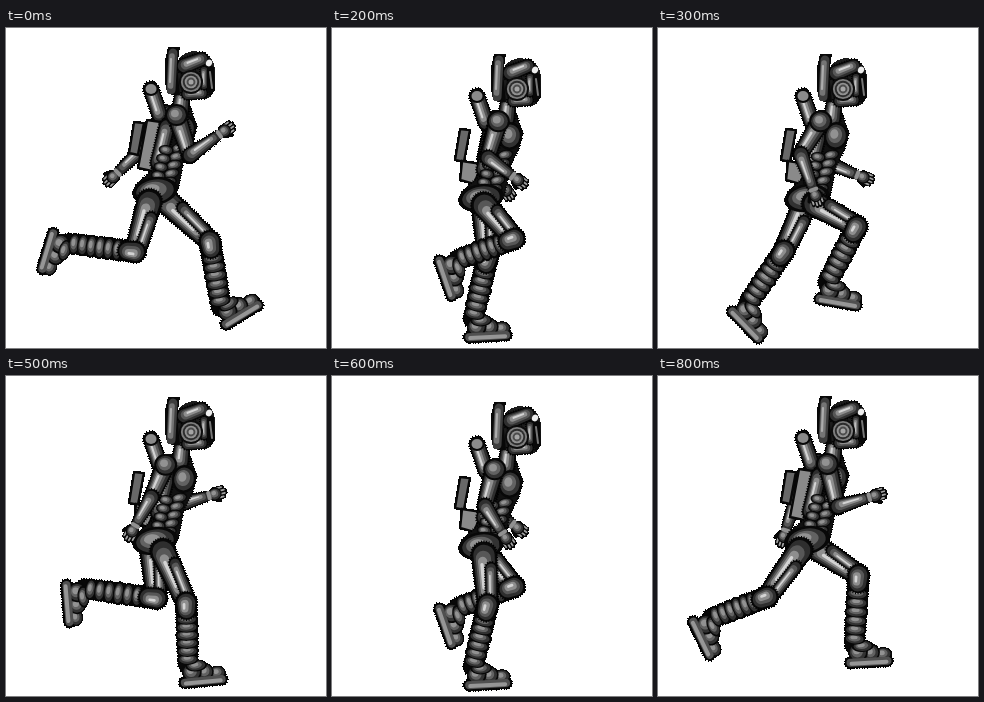
An HTML page with a canvas that plays this animation: 320x320 px, repeating every 900 ms.

```html
<!DOCTYPE html>
<html lang="en">
<head>
<meta charset="utf-8">
<title>Running robot</title>
<style>
  html, body { margin: 0; width: 100%; height: 100%; overflow: hidden; background: #fff; }
  canvas { display: block; width: 100vw; height: 100vh; object-fit: contain; image-rendering: pixelated; }
</style>
</head>
<body>
<canvas id="stage" width="320" height="320"></canvas>
<script>
const ctx = document.getElementById('stage').getContext('2d', { willReadFrequently: true });
const STEP = 100, STEPS = 9, PHASES = 10;
const INK = '#080808';

// ---- geometry ----

const turnOf = p => p / PHASES * 2 * Math.PI;
const mix = (a, b, t) => [a[0] + (b[0] - a[0]) * t, a[1] + (b[1] - a[1]) * t];
const angleOf = (a, b) => Math.atan2(b[1] - a[1], b[0] - a[0]);

// Point measured along and across a direction.
const offset = (p, angle, along, across) => [
  p[0] + Math.cos(angle) * along - Math.sin(angle) * across,
  p[1] + Math.sin(angle) * along + Math.cos(angle) * across
];

// Periodic curve; every term is [harmonic, cosine part, sine part].
function wave(p, mean, ...terms) {
  const a = turnOf(p);
  return terms.reduce((sum, [n, c, s = 0]) =>
    sum + c * Math.cos(n * a) + s * Math.sin(n * a), mean);
}

// ---- gait ----

const bobAt = p => Math.max(0, Math.round(3 + 5 * Math.cos((p - 2.4) / 5 * 2 * Math.PI)));

// Phase 0 is the leg's furthest reach forward.
function legAt(p) {
  return {
    hip: [wave(p, 150, [1, 5]), 168 + bobAt(p) * 0.7],
    knee: [
      wave(p, 163.7, [1, 37.3, -26.1], [2, -1.1, 5.5], [4, 3.9]),
      wave(p, 216.6, [1, -5.4, 11], [2, 1.9, 7.7])
    ],
    ankle: [
      wave(p, 131.7, [1, 76, -16.8], [2, 1.7, 2.8], [4, 5.5]),
      wave(p, 255.6, [1, 31.5, 21], [2, -8.8, -2.6])
    ],
    foot: wave(p, 34, [1, -60, -10], [2, 3.8, 5], [5, -9]) * Math.PI / 180
  };
}

// Phase 0 is the arm's highest forward swing.
function armAt(p) {
  const elbow = [
    wave(p, 158, [1, 21, -5.3], [2, 4.7]),
    wave(p, 126, [1, 6, -2], [2, -4.5])
  ];
  const wrist = [
    wave(p, 168.7, [1, 45.9, -7.4], [2, -6.4, -1.6], [3, 1.9, 1.8]),
    wave(p, 139.3, [1, -16.5, 1.2], [2, -14, -1.6])
  ];
  return { shoulder: [wave(p, 164.5, [1, 6]), 87 + bobAt(p) * 0.9], elbow, wrist };
}

// ---- metal parts ----

// Short bristles around a dark contour.
function fringe() {
  ctx.setLineDash([1, 1.6]);
  ctx.lineWidth = 2;
  ctx.strokeStyle = '#000';
  ctx.stroke();
  ctx.setLineDash([]);
}

function taper(a, b, ra, rb, color) {
  const angle = angleOf(a, b), q = Math.PI / 2;
  ctx.beginPath();
  ctx.arc(a[0], a[1], ra, angle + q, angle - q);
  ctx.arc(b[0], b[1], rb, angle - q, angle + q);
  ctx.closePath();
  ctx.fillStyle = color;
  ctx.fill();
}

function oval([x, y], rx, ry, color, turn = 0) {
  ctx.beginPath();
  ctx.ellipse(x, y, rx, ry, turn, 0, 7);
  ctx.fillStyle = color;
  ctx.fill();
}

function poly(points, color, edge) {
  ctx.beginPath();
  points.forEach(p => ctx.lineTo(...p));
  ctx.closePath();
  ctx.fillStyle = color;
  ctx.fill();
  if (edge) {
    ctx.lineWidth = edge;
    ctx.strokeStyle = INK;
    ctx.stroke();
  }
}

const gray = v => `rgb(${v},${v},${v})`;

// Nested layers, each narrower, shorter and brighter.
function metal(a, b, ra, rb) {
  taper(a, b, ra, rb, INK);
  fringe();
  const angle = angleOf(a, b), side = Math.sin(angle) > 0 ? 1 : -1;
  for (let i = 0; i < 4; i++) {
    const k = 0.82 - i * 0.23, shift = side * ra * i * 0.07, trim = 0.02 + i * 0.07;
    const move = p => offset(p, angle, 0, shift);
    taper(move(mix(a, b, trim)), move(mix(b, a, trim)), ra * k, rb * k, gray(46 + i * 34 + i * i * 7));
  }
}

function bead(p, rx, ry, turn = 0) {
  oval(p, rx, ry, INK, turn);
  for (let i = 0; i < 3; i++) {
    const k = 0.82 - i * 0.24;
    const q = [p[0] - rx * 0.07 * i, p[1] - ry * 0.07 * i];
    oval(q, rx * k, ry * k, gray(50 + i * 48), turn);
  }
}

// ---- limbs ----

function boot(ankle, foot) {
  const at = (along, across) => offset(ankle, foot, along, across);
  const heel = at(-5, 18), toe = at(32, 18);
  taper(heel, toe, 6, 6, INK);
  fringe();
  bead(at(28, 11), 9, 7, foot);
  bead(at(16, 9), 9, 9, foot);
  bead(at(3, 8), 10, 10, foot);
  bead(at(8, 2), 11, 6, foot);
  taper(heel, toe, 4, 4, '#505050');
  taper(at(-4, 19), at(31, 19), 2, 2, '#969696');
}

function leg({ hip, knee, ankle, foot }) {
  const shin = angleOf(knee, ankle), thigh = angleOf(hip, knee);
  taper(knee, ankle, 11, 10, INK);
  fringe();
  boot(ankle, foot);
  for (let i = 6; i >= 1; i--) {
    bead(mix(knee, ankle, 0.14 + i * 0.13), 5.6, 12 - Math.abs(i - 3) * 0.4, shin);
  }
  metal(mix(hip, knee, 0.1), mix(hip, knee, 0.88), 13, 11);
  const muscle = (t, across) => offset(mix(hip, knee, t), thigh, 0, across);
  metal(muscle(0.35, -6), muscle(0.95, -4), 6, 6);
  metal(knee, mix(knee, ankle, 0.12), 11, 10);
}

function hand(wrist, angle) {
  const at = (along, across) => offset(wrist, angle, along, across);
  for (let i = -1.5; i <= 1.5; i++) {
    const reach = 22 - Math.abs(i) * 2;
    taper(at(9, i * 3), at(reach, i * 3.2), 2.4, 1.9, INK);
    taper(at(10, i * 3), at(reach - 1, i * 3.2), 1.1, 0.9, '#a0a0a0');
  }
  taper(at(7, 4), at(14, 8), 2.2, 1.8, INK);
  bead(at(10, 0), 7, 6.5, angle);
  taper(at(4, -3), at(4, 3), 2, 2, '#909090');
}

function arm({ shoulder, elbow, wrist }) {
  metal(mix(shoulder, elbow, 0.2), elbow, 9.5, 8);
  metal(elbow, wrist, 8, 5.5);
  hand(wrist, angleOf(elbow, wrist));
  bead(shoulder, 11.5, 11);
}

// ---- body ----

function pack(open) {
  metal([145, 61], [154, 88], 8, 8);
  oval([145, 61], 7.5, 7, INK);
  oval([145, 61], 5.5, 5, '#8a8a8a');
  poly([[128, 94], [138, 95], [132, 127], [123, 125]], '#686868', 2.5);
  if (open) {
    poly([[141, 92], [155, 94], [158, 115], [150, 144], [132, 140]], '#8a8a8a', 2.5);
  } else {
    poly([[130, 126], [150, 129], [142, 149], [128, 145]], '#8a8a8a', 2.5);
  }
}

function torso() {
  poly([[166, 76], [184, 78], [191, 98], [187, 114], [178, 132], [173, 159],
    [153, 174], [129, 168], [130, 156], [145, 143], [152, 100]], '#111');
  fringe();
  metal([176, 68], [174, 84], 8, 9);
  metal([161, 98], [152, 135], 8, 8);
  bead([178, 101], 12, 14, 0.15);
  for (let row = 0; row < 5; row++) {
    const x = 173 - row * 2.6, y = 120 + row * 8.5;
    bead([x, y], 8.5, 5, -0.25);
    bead([x - 13, y + 2], 7.5, 5, 0.15);
  }
  bead([149, 163], 23, 14, -0.15);
}

function head() {
  // helmet
  ctx.beginPath();
  ctx.moveTo(169, 39);
  ctx.bezierCurveTo(173, 26, 184, 21, 194, 24);
  ctx.bezierCurveTo(205, 26, 210, 34, 209, 49);
  ctx.bezierCurveTo(211, 61, 206, 73, 196, 71);
  ctx.bezierCurveTo(183, 72, 174, 69, 169, 61);
  ctx.closePath();
  ctx.fillStyle = '#1c1c1c';
  ctx.fill();
  metal([178, 38], [196, 31], 8, 7);
  metal([181, 66], [196, 65], 6, 6);
  metal([198, 42], [198, 58], 4, 4);
  poly([[201, 36], [208, 39], [209, 62], [204, 69], [201, 62]], INK);
  oval([203, 35], 3, 3.5, '#eee', 0.5);
  taper([204, 44], [206, 60], 1, 1, '#777');
  // ear
  for (let i = 0; i < 6; i++) {
    oval([185, 54], 12 - i * 1.9, 12 - i * 1.9, gray(i % 2 ? 115 + i * 10 : 12 + i * 16));
  }
  // fin
  ctx.beginPath();
  ctx.moveTo(162, 19);
  ctx.lineTo(174, 19);
  ctx.lineTo(171, 38);
  ctx.lineTo(174, 67);
  ctx.quadraticCurveTo(163, 69, 160, 61);
  ctx.quadraticCurveTo(156, 40, 162, 19);
  ctx.closePath();
  ctx.fillStyle = INK;
  ctx.fill();
  for (let i = 0; i < 3; i++) {
    taper([167 - i, 25 + i * 3], [165 - i * 0.5, 62 - i * 4], 4.5 - i * 1.7, 4.5 - i * 1.7, gray(62 + i * 55));
  }
}

function shifted(y, paint) {
  ctx.save();
  ctx.translate(0, y);
  paint();
  ctx.restore();
}

// Hard silhouette without soft edge pixels.
function crisp() {
  const image = ctx.getImageData(0, 0, 320, 320), d = image.data;
  for (let i = 3; i < d.length; i += 4) d[i] = d[i] < 128 ? 0 : 255;
  ctx.putImageData(image, 0, 0);
}

function draw(near) {
  const far = near + PHASES / 2;
  const bob = bobAt(near);
  ctx.clearRect(0, 0, 320, 320);
  // Each arm swings against the leg on its own side.
  arm(armAt(near));
  leg(legAt(far));
  shifted(bob, () => {
    pack(Math.cos(turnOf(far)) > 0.5);
    torso();
  });
  leg(legAt(near));
  shifted(bob, head);
  arm(armAt(far));
  crisp();
}

// The second stride is one phase shorter than the first.
const phaseAt = step => (step + 5 + (step > 4)) % PHASES;

let shown = -1;
const start = performance.now();
function tick() {
  const step = Math.floor((performance.now() - start) / STEP) % STEPS;
  if (step !== shown) {
    shown = step;
    draw(phaseAt(step));
  }
  requestAnimationFrame(tick);
}
tick();
</script>
</body>
</html>
```
